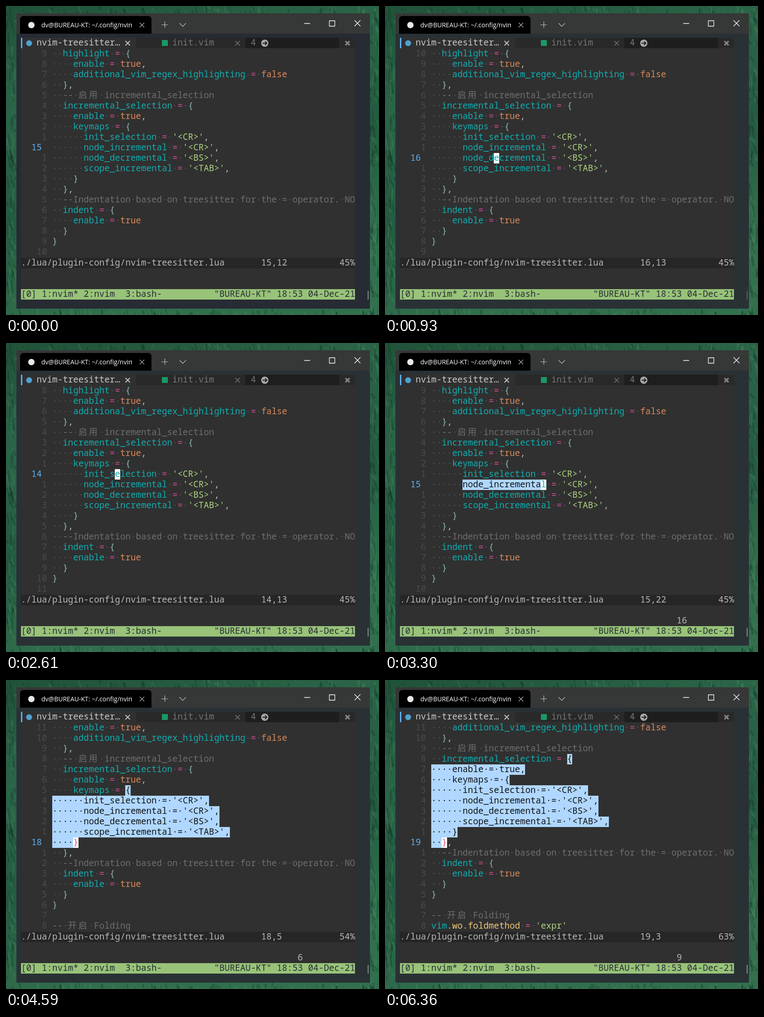
Write an HTML page with a canvas that moves like this. It is 823x681 px and loops after 8000 ms.

```html
<!DOCTYPE html>
<html lang="en">
<head>
<meta charset="utf-8">
<title>Incremental selection</title>
<style>
html, body { margin: 0; width: 100%; height: 100%; overflow: hidden; background: #23583e; }
canvas { display: block; }
</style>
</head>
<body>
<canvas id="stage" width="823" height="681"></canvas>
<script>
const g = document.getElementById('stage').getContext('2d');
const MONO = '19.2px "Noto Sans Mono", "Noto Sans CJK SC", monospace';
const CW = 11.52, RH = 23.05, X0 = 33, Y0 = 93.5, CODE = 6, FIRST = 6, ROWS = 20, LOOP = 8000;
const TEAL = '#10adb0', DOT = '#545454', GREY = '#b9b9b9', DIM = '#757575';

const lines = `  highlight = {
    enable = true,
    additional_vim_regex_highlighting = false
  },
  -- 启用 incremental_selection
  incremental_selection = {
    enable = true,
    keymaps = {
      init_selection = '<CR>',
      node_incremental = '<CR>',
      node_decremental = '<BS>',
      scope_incremental = '<TAB>',
    }
  },
  --Indentation based on treesitter for the = operator. NO
  indent = {
    enable = true
  }
}

-- 开启 Folding
vim.wo.foldmethod = 'expr'`.split('\n');

// Editor states: start time, cursor line and column, top line, pending text, selection start
const states = [
  { t: 0, line: 15, col: 12, top: 6, hidden: true },
  { t: 870, line: 16, col: 13, top: 6, hidden: true },
  { t: 900, line: 16, col: 13, top: 6 },
  { t: 2460, line: 15, col: 13, top: 6, cmd: 'k' },
  { t: 2490, line: 15, col: 13, top: 6 },
  { t: 2610, line: 14, col: 13, top: 6 },
  { t: 2820, line: 15, col: 13, top: 6 },
  { t: 3270, line: 15, col: 22, top: 6, from: [15, 6] },
  { t: 3300, line: 15, col: 22, top: 6, cmd: '16', from: [15, 6] },
  { t: 3990, line: 15, col: 31, top: 6, cmd: '25', from: [15, 6] },
  { t: 4560, line: 15, col: 31, top: 6, from: [15, 6] },
  { t: 4590, line: 18, col: 5, top: 7, cmd: '6', from: [13, 14] },
  { t: 5550, line: 18, col: 5, top: 7, cmd: '6', from: [13, 4] },
  { t: 6360, line: 19, col: 3, top: 8, cmd: '9', from: [11, 26] },
];
const tints = [[0, '#272b34'], [900, '#282f35'], [930, '#293135']];
const bars = [[0, '#8c8c8c'], [270, '#5c5f63'], [2160, '#6c7073'], [2280, '#8c8c8c']];
const pick = (list, t) => list.filter(e => e[0] <= t).pop()[1];

const cx = c => X0 + c * CW;
const ry = r => Y0 + r * RH;

function box(color, x, y, w, h) {
  g.fillStyle = color;
  g.fillRect(x, y, w, h);
}

function cells(color, col, row, n) {
  const x = Math.round(cx(col)), y = Math.round(ry(row));
  box(color, x, y, Math.round(cx(col + n)) - x, Math.round(ry(row + 1)) - y);
}

function put(str, col, row, color) {
  g.font = MONO;
  g.fillStyle = color;
  for (const ch of str) {
    if (ch !== ' ') g.fillText(ch, cx(col), ry(row) + 17);
    col += ch > '\u2e80' ? 2 : 1;
  }
}

function stroke(color, width, ...paths) {
  g.strokeStyle = color;
  g.lineWidth = width;
  g.beginPath();
  for (const p of paths)
    for (let i = 0; i < p.length; i += 2) g[i ? 'lineTo' : 'moveTo'](p[i], p[i + 1]);
  g.stroke();
}

function cross(x, y, r, color, width) {
  stroke(color, width, [x - r, y - r, x + r, y + r], [x - r, y + r, x + r, y - r]);
}

function disc(color, x, y, r) {
  g.fillStyle = color;
  g.beginPath();
  g.arc(x, y, r, 0, 7);
  g.fill();
}

function wallpaper() {
  const grad = g.createLinearGradient(0, 0, 200, 681);
  ['#205239', '#2b6548', '#245b40', '#316f4e'].forEach((c, i) => grad.addColorStop(i / 3, c));
  box(grad, 0, 0, 823, 681);
  let seed = 11;
  const rnd = () => (seed = seed * 16807 % 2147483647) / 2147483647;
  for (let i = 0; i < 420; i++) {
    const side = i % 4;
    const x = side === 0 ? rnd() * 24 : side === 1 ? 802 + rnd() * 22 : rnd() * 823;
    const y = side === 2 ? rnd() * 18 : side === 3 ? 666 + rnd() * 16 : rnd() * 681;
    const len = 6 + rnd() * 22, lean = rnd() * 10 - 2;
    const color = rnd() < .6 ? 'rgba(14,52,35,.32)' : 'rgba(86,146,108,.24)';
    stroke(color, 1 + rnd() * 4, [x, y, x + lean, y + len]);
  }
}

function titleBar() {
  box('#363737', 23, 16, 780, 45);
  g.fillStyle = '#000';
  g.beginPath();
  g.roundRect(31, 22, 290, 39, [7, 7, 0, 0]);
  g.fill();
  disc('#e8e8e8', 56, 42, 7);
  g.save();
  g.beginPath();
  g.rect(78, 24, 200, 36);
  g.clip();
  g.font = '14px "Open Sans", sans-serif';
  g.fillStyle = '#fff';
  g.fillText('dv@BUREAU-KT: ~/.config/nvim', 78, 47);
  g.restore();
  cross(300, 42, 5, '#b5b5b5', 1.2);
  stroke('#c4c4c4', 1.2, [343, 41.5, 357, 41.5], [350.5, 34, 350.5, 48]);
  stroke('#c4c4c4', 1.2, [383, 38, 390, 45, 397, 38]);
  stroke('#fff', 1.3, [658, 38.5, 671, 38.5], [713.5, 32.5, 725.5, 32.5, 725.5, 44.5, 713.5, 44.5, 713.5, 32]);
  cross(775.5, 38, 6.5, '#fff', 1.3);
}

function tabLine() {
  const y = 70, h = 23;
  box('#303030', 33, y, 737, h);
  box('#292929', 287, y, 241, h);
  box('#1e1e1e', 528, y, 207, h);
  box('#292929', 735, y, 35, h);
  box('#61afef', 33, y, 3, h);
  disc('#51a0cf', 51, 82, 6.5);
  put('nvim-treesitter…', 3, -1, '#c8c8c8');
  cross(268.5, 82, 5, '#c8c8c8', 1.8);
  box('#1a9a66', 344, 75, 13, 13);
  put('init.vim', 29, -1, DIM);
  cross(511, 82, 5, DIM, 1.6);
  put('4', 44, -1, DIM);
  disc('#a8a8a8', 571, 82, 8);
  stroke('#1e1e1e', 2, [566, 82, 575, 82], [571.5, 78, 575.5, 82, 571.5, 86]);
  cross(753.5, 82, 4.5, '#858585', 3.2);
}

function tokenColor(tok) {
  if (tok.startsWith('--')) return '#6e6e6e';
  if (tok[0] === "'") return '#add47f';
  if (tok === 'true' || tok === 'false') return '#d9885a';
  if (tok === '=') return '#cf4a94';
  if ('{}'.includes(tok)) return '#8ab8b0';
  if (tok === ',') return '#c0c0c0';
  return tok[0] === '.' ? '#efc878' : TEAL;
}

function codeLine(n, row, s) {
  const text = lines[n - FIRST], cur = s.col - 1;
  let start = 0, end = 0;
  if (s.from && n >= s.from[0] && n <= s.line) {
    start = n === s.from[0] ? s.from[1] : 0;
    end = n === s.line ? cur : text.length;
    cells('#b0d7ff', CODE + start, row, end - start);
  }
  const onCursor = n === s.line && !s.hidden;
  if (onCursor) cells('#fff', CODE + cur, row, 1);

  let i = 0, col = 0;
  for (const tok of text.match(/--.*|'[^']*'|\.\w+|\w+|\s|\S/g) || []) {
    const color = tokenColor(tok);
    for (const ch of tok) {
      const blank = ch === ' ';
      let ink = blank ? DOT : color;
      if (i >= start && i < end) ink = '#101418';
      else if (onCursor && i === cur && ch === '}') ink = '#e0506c';
      put(blank ? '·' : ch, CODE + col, row, ink);
      col += ch > '\u2e80' ? 2 : 1;
      i++;
    }
  }
  if (n === s.line) put(String(n), 2, row, '#61afef');
  else put(String(Math.abs(n - s.line)).padStart(2), 3, row, '#4b4b4b');
}

function draw(t) {
  const s = states.filter(e => e.t <= t).pop();
  wallpaper();
  box(pick(tints, t), 23, 60, 780, 607);
  titleBar();
  box('#303030', 33, 70, 737, 554);
  tabLine();
  for (let r = 0; r < ROWS; r++) codeLine(s.top + r, r, s);

  cells('#262626', 0, 20, 64);
  put('./lua/plugin-config/nvim-treesitter.lua', 0, 20, GREY);
  put(s.line + ',' + s.col, 46, 20, GREY);
  put(45 + 9 * (s.top - 6) + '%', 61, 20, GREY);
  put(s.cmd || '', 53, 22, GREY);
  cells('#98c379', 0, 23, 64);
  put('[0] 1:nvim* 2:nvim  3:bash-', 0, 23, '#282c34');
  put('"BUREAU-KT" 18:53 04-Dec-21', 37, 23, '#282c34');
  box(pick(bars, t), 798, 628, 2, 19);
}

const marks = [...states.map(s => s.t), ...tints.map(e => e[0]), ...bars.map(e => e[0])];
const begin = performance.now();
let shown = -1;
function tick() {
  const t = (performance.now() - begin) % LOOP;
  const mark = Math.max(...marks.filter(m => m <= t));
  if (mark !== shown) draw(shown = mark);
  requestAnimationFrame(tick);
}
tick();
</script>
</body>
</html>
```
